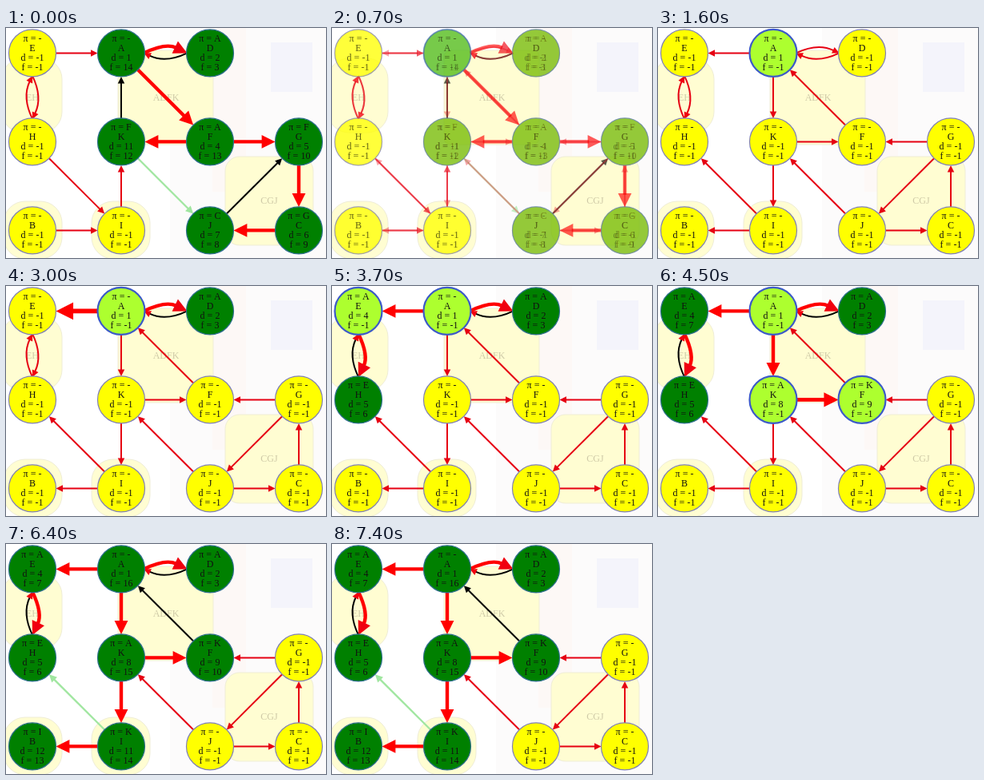
These frames come from a looping animation (400 by 288 pixels, 7.5 s). An HTML page with a canvas:

```html
<!DOCTYPE html>
<html lang="en">
<head>
<meta charset="utf-8">
<title>Depth-first search on a transposed graph</title>
<style>
html, body { margin: 0; width: 100%; height: 100%; overflow: hidden; background: #fff; }
canvas { display: block; width: 400px; height: 288px; }
</style>
</head>
<body>
<canvas id="stage" width="400" height="288"></canvas>
<script>
const ctx = document.getElementById('stage').getContext('2d');
const LOOP = 7500, STEP = 150, SEARCH_START = 2280;
const FADE_START = 350, FADE_TIME = 1000;
const RADIUS = 29.5, THIN = 2, THICK = 4.4;
const FONT = '12px "Liberation Serif", "Times New Roman", serif';

// Node centres lie on a 4 by 3 grid; a dot is an empty cell.
const nodes = {};
['EAD.', 'HKFG', 'BIJC'].forEach((row, r) => [...row].forEach((name, c) => {
  if (name !== '.') nodes[name] = { x: 33 + 111 * c, y: 31.4 + 111 * r };
}));

const transposed = 'AE AD DA EH HE AK KF FA GF CG JC GJ JK IH KI IB'.split(' ');
const original = transposed.map(e => e[1] + e[0]);

// Two letters explore an edge; a letter and a number discover or finish a node.
const firstSearch = ('A1 AD D2 DA D3 AF F4 FG G5 GC C6 CJ J7 JG J8 C9 G10 ' +
  'FK K11 KJ KA K12 F13 A14').split(' ');
const secondSearch = ('AD D2 DA D3 AE E4 EH H5 HE H6 E7 AK K8 KF F9 FA F10 ' +
  'KI I11 IH IB B12 B13 I14 K15 A16').split(' ');

function replay(steps) {
  const state = { node: {}, edge: {} };
  for (const name in nodes) state.node[name] = { parent: '-', d: -1, f: -1 };
  steps.forEach((step, i) => {
    const [from, to] = step;
    const value = +step.slice(1);
    if (value) {
      const node = state.node[from];
      if (node.d < 0) node.d = value; else node.f = value;
      return;
    }
    const target = state.node[to];
    const kind = target.d < 0 ? 'tree' : target.f < 0 ? 'back' : 'cross';
    if (kind === 'tree') target.parent = from;
    state.edge[step] = { kind, index: i };
  });
  // A parent is shown only once its child has been discovered.
  for (const name in nodes) {
    if (state.node[name].d < 0) state.node[name].parent = '-';
  }
  return state;
}

function label(text, x, y, color) {
  ctx.font = FONT;
  ctx.textAlign = 'center';
  ctx.fillStyle = color;
  ctx.fillText(text, x, y);
}

function drawEdge(name, curved, color, width) {
  const a = nodes[name[0]], b = nodes[name[1]];
  const length = Math.hypot(b.x - a.x, b.y - a.y);
  const ux = (b.x - a.x) / length, uy = (b.y - a.y) / length;
  const gap = RADIUS - (curved ? 1 : 0);
  const bow = curved ? 13 : 0;
  const start = { x: a.x + ux * gap, y: a.y + uy * gap };
  const tip = { x: b.x - ux * gap, y: b.y - uy * gap };
  const bend = { x: (a.x + b.x) / 2 + uy * bow, y: (a.y + b.y) / 2 - ux * bow };
  const angle = Math.atan2(tip.y - bend.y, tip.x - bend.x);
  const head = 3.5 * width + 1.5;

  ctx.strokeStyle = color;
  ctx.lineWidth = width;
  ctx.beginPath();
  ctx.moveTo(start.x, start.y);
  ctx.quadraticCurveTo(bend.x, bend.y,
    tip.x - Math.cos(angle) * head * 0.9, tip.y - Math.sin(angle) * head * 0.9);
  ctx.stroke();

  ctx.save();
  ctx.translate(tip.x, tip.y);
  ctx.rotate(angle);
  ctx.fillStyle = curved ? '#f00010' : color;
  ctx.beginPath();
  ctx.moveTo(0, 0);
  ctx.lineTo(-head, -head / 2);
  ctx.lineTo(-head, head / 2);
  ctx.fill();
  ctx.restore();
}

function drawNode(name, { parent, d, f }) {
  const { x, y } = nodes[name];
  const active = d > 0 && f < 0;
  ctx.beginPath();
  ctx.arc(x, y, RADIUS, 0, 2 * Math.PI);
  ctx.fillStyle = active ? '#adff2f' : f > 0 ? '#008000' : '#ffff00';
  ctx.fill();
  ctx.strokeStyle = active ? '#3c5ac8' : f > 0 ? '#2d6e8c' : '#8080b4';
  ctx.lineWidth = active ? 2.2 : 1.2;
  ctx.stroke();
  [`π = ${parent}`, name, `d = ${d}`, `f = ${f}`].forEach((text, i) =>
    label(text, x, y - 14 + 11.8 * i, '#111'));
}

function drawGraph(edges, state, alpha, treeWidth) {
  if (alpha <= 0) return;
  ctx.globalAlpha = alpha;
  const styles = {
    plain: () => ['#e60012', THIN],
    back: () => ['#000', THIN],
    cross: () => ['#a0e6a0', THIN + 0.3],
    tree: index => ['#ff0000', treeWidth(index)]
  };
  const draw = name => {
    const { kind, index } = state.edge[name] || { kind: 'plain' };
    drawEdge(name, edges.includes(name[1] + name[0]), ...styles[kind](index));
  };
  const isTree = name => state.edge[name] && state.edge[name].kind === 'tree';
  edges.filter(name => !isTree(name)).forEach(draw);
  edges.filter(isTree).forEach(draw);
  for (const name in nodes) drawNode(name, state.node[name]);
  ctx.globalAlpha = 1;
}

function drawBackground() {
  const rect = (color, ...box) => {
    ctx.fillStyle = color;
    ctx.fillRect(...box);
  };
  rect('#fff', 0, 0, 400, 288);
  rect('#fcfbfb', 205, 0, 195, 288);
  rect('#fdf8f6', 258, 0, 42, 205);
  rect('#f4f4fb', 331, 18, 52, 62);

  const boxes = [[-5, 38, 75, 93, 26], [140, 28, 119, 118, 8], [-3, 217, 73, 72, 27],
    [107, 217, 73, 72, 27], [274, 161, 110, 111, 18]];
  ctx.lineWidth = 1;
  ctx.fillStyle = '#fffdd2';
  ctx.strokeStyle = '#efedd6';
  for (const box of boxes) {
    ctx.beginPath();
    ctx.roundRect(...box);
    ctx.fill();
    ctx.stroke();
  }
  label('EH', 33, 91, '#cfcaa8');
  label('ADFK', 200, 91, '#cfcaa8');
  label('CGJ', 329, 220, '#cfcaa8');
}

const firstResult = replay(firstSearch);

function draw(t) {
  const fade = Math.min(1, Math.max(0, (t - FADE_START) / FADE_TIME));
  const count = Math.max(0, Math.floor((t - SEARCH_START) / STEP) + 1);
  const state = replay(['A1', ...secondSearch.slice(0, count)]);
  // Newly taken tree edges flash thick, then settle.
  const pulse = index => {
    const age = t - SEARCH_START - (index - 1) * STEP;
    return THICK + 4 * Math.exp(-age / 110);
  };
  drawBackground();
  drawGraph(original, firstResult, 1 - fade, () => THICK);
  drawGraph(transposed, state, fade, pulse);
}

const began = performance.now();
function tick() {
  draw((performance.now() - began) % LOOP);
  requestAnimationFrame(tick);
}
tick();
</script>
</body>
</html>
```
